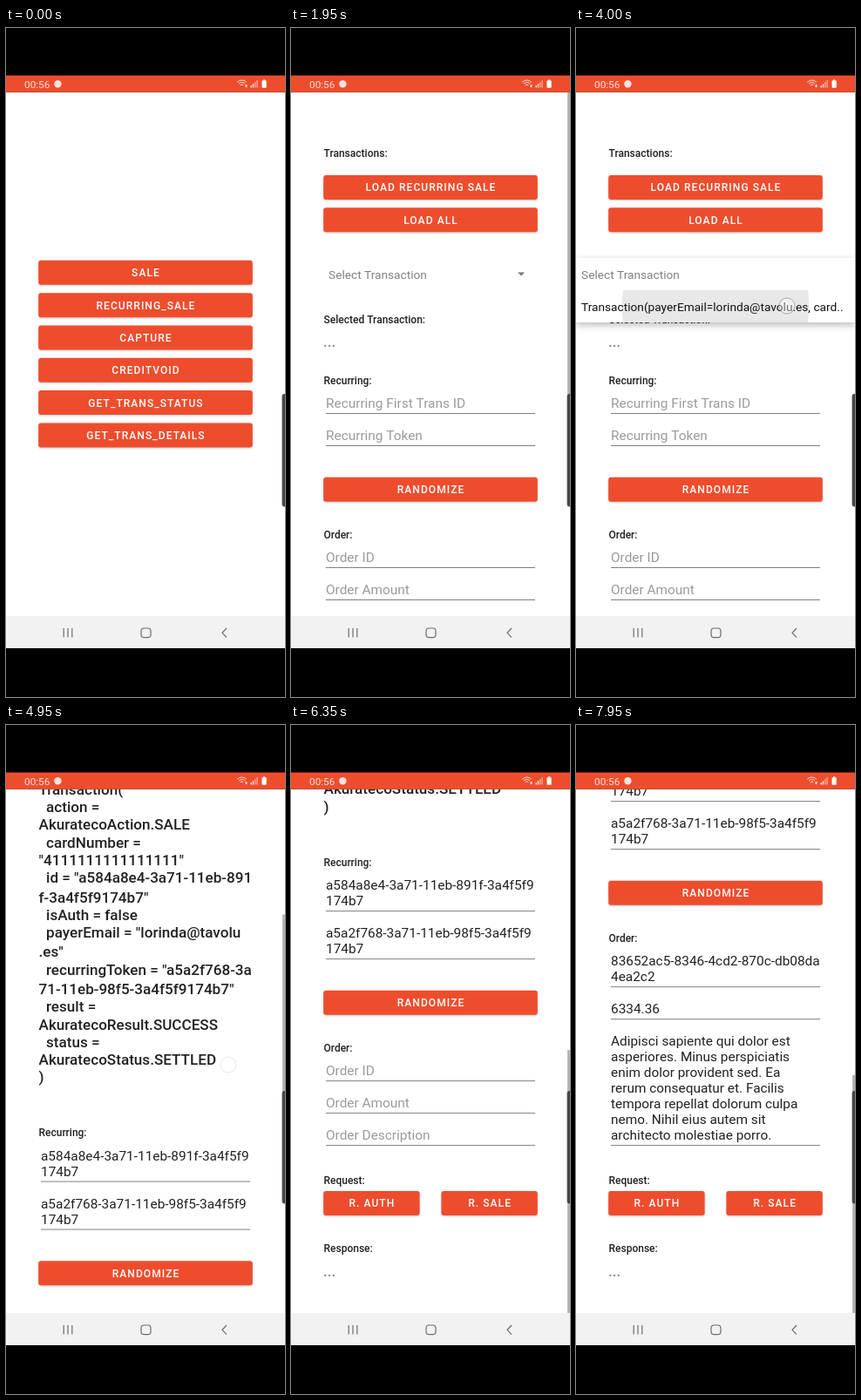
Animation of 320x768 px, one loop 8000 ms. Source, as an HTML page with a canvas:

```html
<!DOCTYPE html>
<html lang="en">
<head>
<meta charset="utf-8">
<title>Recurring sale</title>
<style>
  html, body { margin: 0; width: 100%; height: 100%; overflow: hidden; background: #000; }
  canvas { display: block; width: 320px; height: 768px; }
</style>
</head>
<body>
<canvas id="stage"></canvas>
<script>
const LOOP = 8000, W = 320, TOP = 73.7, BOTTOM = 675, VIEW = BOTTOM - TOP;
const RED = '#ee4d2d', INK = '#212121', HINT = '#9a9a9a';
const FILLED = 4200, RANDOM = 6780;
const stage = document.getElementById('stage');
const g = stage.getContext('2d');
const dpr = window.devicePixelRatio || 1;
stage.width = W * dpr;
stage.height = 768 * dpr;

const MENU = ['SALE', 'RECURRING_SALE', 'CAPTURE', 'CREDITVOID', 'GET_TRANS_STATUS', 'GET_TRANS_DETAILS'];
const DETAILS = [
  'Transaction(', '  action =', 'AkuratecoAction.SALE', '  cardNumber =', '"4111111111111111"',
  '  id = "a584a8e4-3a71-11eb-891', 'f-3a4f5f9174b7"', '  isAuth = false',
  '  payerEmail = "lorinda@tavolu', '.es"', '  recurringToken = "a5a2f768-3a',
  '71-11eb-98f5-3a4f5f9174b7"', '  result =', 'AkuratecoResult.SUCCESS',
  '  status =', 'AkuratecoStatus.SETTLED', ')'
];
const WRAPPED = [6, 9, 11];
const FIRST_ID = ['a584a8e4-3a71-11eb-891f-3a4f5f9', '174b7'];
const TOKEN = ['a5a2f768-3a71-11eb-98f5-3a4f5f9', '174b7'];
const ORDER_ID = ['83652ac5-8346-4cd2-870c-db08da', '4ea2c2'];
const DESCRIPTION = [
  'Adipisci sapiente qui dolor est', 'asperiores. Minus perspiciatis',
  'enim dolor provident sed. Ea', 'rerum consequatur et. Facilis',
  'tempora repellat dolorum culpa', 'nemo. Nihil eius autem sit', 'architecto molestiae porro.'
];

// Finger: shown from, released, x, start y, end y
const TOUCHES = [
  [1270, 1420, 235, 319, 319],
  [2400, 2560, 240, 184, 184],
  [3050, 3220, 240, 284, 284],
  [3850, 4060, 242, 319, 319],
  [4610, 4900, 255, 592, 390],
  [5370, 5800, 238, 411, 262],
  [6500, 6650, 238, 320, 320],
  [7310, 7640, 242, 470, 290]
];

const ramp = (t, a, b) => Math.min(1, Math.max(0, (t - a) / (b - a)));
const smooth = p => p * p * (3 - 2 * p);
const easeOut = p => 1 - (1 - p) ** 3;

function text(str, x, mid, size, color, weight = 400, align = 'left', spacing = 0) {
  g.font = `${weight} ${size}px Roboto, sans-serif`;
  g.letterSpacing = spacing + 'px';
  g.textAlign = align;
  g.fillStyle = color;
  g.fillText(str, x, mid + size * 0.355);
}

function box(x, y, w, h, r, color) {
  g.beginPath();
  g.roundRect(x, y, w, h, r);
  g.fillStyle = color;
  g.fill();
}

function line(points, color, width) {
  g.beginPath();
  points.forEach(([x, y]) => g.lineTo(x, y));
  g.strokeStyle = color;
  g.lineWidth = width;
  g.stroke();
}

function shadow(blur, dy, alpha, draw) {
  g.save();
  g.shadowColor = `rgba(0,0,0,${alpha})`;
  g.shadowBlur = blur * dpr;
  g.shadowOffsetY = dy * dpr;
  draw();
  g.restore();
}

// Circle that spreads inside a rectangle after a press, then fades
function ripple(t, start, x, y, w, h, color) {
  const p = ramp(t, start, start + 250);
  const alpha = 1 - ramp(t, start + 230, start + 400);
  if (!p || !alpha) return;
  g.save();
  g.globalAlpha *= alpha;
  g.beginPath();
  g.roundRect(x, y, w, h, 3);
  g.clip();
  g.beginPath();
  g.arc(x + w / 2, y + h / 2, p * 178, 0, 7);
  g.fillStyle = color;
  g.fill();
  g.restore();
}

function button(label, y, t, pressed, x = 37.2, w = 245.6) {
  shadow(2.5, 1, 0.22, () => box(x, y, w, 28, 3, RED));
  if (pressed) ripple(t, pressed, x, y, w, 28, 'rgba(255,255,255,.25)');
  text(label, x + w / 2 + 0.5, y + 14.2, 12, '#fff', 500, 'center', 1.07);
}

const label = (str, y) => text(str, 37.5, y, 12, INK, 500);
const dots = y => text('...', 37, y, 17.1, '#8a8a8a', 500);

// Draws a field and returns the y of its underline
function field(y, hint, lines) {
  (lines || [hint]).forEach((s, i) => text(s, 40, y + i * 18.05, 15.4, lines ? INK : HINT));
  const base = y + 12 + (lines ? lines.length - 1 : 0) * 18;
  line([[40, base], [280, base]], '#808080', 1);
  return base;
}

function scrollAt(t) {
  return 189 * ramp(t, 4680, 4900) ** 2 + 353.5 * easeOut(ramp(t, 4900, 5400))
    + 54.5 * smooth(ramp(t, 5500, 5750)) + 126 * smooth(ramp(t, 7380, 7800));
}

function menu(t) {
  MENU.forEach((s, i) => button(s, 266.8 + i * 37.33, t, i === 1 && 1300));
}

// Draws the form and returns the y of its end
function form(t) {
  const filled = t >= FILLED, random = t >= RANDOM;
  label('Transactions:', 144);
  button('LOAD RECURRING SALE', 168.9, t, 2430);
  button('LOAD ALL', 206.2, t);

  ripple(t, 3080, 37, 264, 246, 37, 'rgba(0,0,0,.08)');
  text(filled ? 'Transaction(payerEmail=lorinda@t..' : 'Select Transaction', 43, 283, 13.7, filled ? INK : '#808080');
  g.beginPath();
  g.moveTo(260, 280.5);
  g.lineTo(268, 280.5);
  g.lineTo(264, 284.5);
  g.fillStyle = '#757575';
  g.fill();

  label('Selected Transaction:', 334.5);
  let y = 360.5;
  if (filled) {
    DETAILS.forEach((s, i) => {
      if (i) y += WRAPPED.includes(i) ? 22.5 : 20.2;
      text(s, 37.5, y, 17.1, INK, 500);
    });
    y += 20;
  } else {
    dots(y - 0.6);
  }

  y += 44;
  label('Recurring:', y);
  y = field(y + 26, 'Recurring First Trans ID', filled && FIRST_ID);
  y = field(y + 25, 'Recurring Token', filled && TOKEN);
  y += 36.2;
  button('RANDOMIZE', y, t, 6530);

  y += 65.8;
  label('Order:', y);
  y = field(y + 26, 'Order ID', random && ORDER_ID);
  y = field(y + 25, 'Order Amount', random && ['6334.36']);
  y = field(y + 25, 'Order Description', random && DESCRIPTION);

  y += 40;
  label('Request:', y);
  button('R. AUTH', y + 12.3, t, 0, 37.2, 110.4);
  button('R. SALE', y + 12.3, t, 0, 172.4, 110.4);
  label('Response:', y + 78.5);
  dots(y + 104);
  return y + 152.5;
}

function popup(t) {
  const alpha = ramp(t, 3280, 3480) * (1 - ramp(t, 4150, 4300));
  if (!alpha) return;
  g.save();
  g.globalAlpha = alpha;
  shadow(9, 3, 0.28, () => box(0, 264, W, 74, 1, '#fff'));
  ripple(t, 3850, 0, 301, W, 37, '#e8e8e8');
  text('Select Transaction', 6, 283, 13.7, '#808080');
  text('Transaction(payerEmail=lorinda@tavolu.es, card..', 6, 320, 13.7, '#111');
  g.restore();
}

function scrollbar(t, scroll, end) {
  const alpha = ramp(t, 1750, 1800) * (1 - ramp(t, 2400, 2600))
    + ramp(t, 4640, 4700) * (1 - ramp(t, 6620, 6780)) + ramp(t, 7360, 7420);
  const ratio = VIEW / (end - TOP);
  g.save();
  g.globalAlpha = alpha;
  g.fillStyle = '#b4b4b4';
  g.fillRect(317, TOP + scroll * ratio, 3, VIEW * ratio);
  g.restore();
}

function formScreen(t) {
  const p = easeOut(ramp(t, 1520, 1820));
  if (!p) return;
  const scroll = scrollAt(t), size = 0.9 + 0.1 * p;
  g.save();
  g.globalAlpha = p;
  g.translate(160, 375);
  g.scale(size, size);
  g.translate(-160, -375);
  g.fillStyle = '#fff';
  g.fillRect(0, TOP, W, VIEW);
  g.translate(0, -scroll);
  const end = form(t);
  g.restore();
  popup(t);
  scrollbar(t, scroll, end);
}

function touches(t) {
  for (const [from, to, x, y0, y1] of TOUCHES) {
    const alpha = ramp(t, from, from + 60) * (1 - ramp(t, to, to + 70));
    if (!alpha) continue;
    const y = y0 + (y1 - y0) * ramp(t, from + 90, to) ** 2;
    g.save();
    g.globalAlpha = alpha;
    g.beginPath();
    g.arc(x, y, 9, 0, 7);
    g.fillStyle = 'rgba(255,255,255,.4)';
    g.fill();
    g.strokeStyle = 'rgba(125,125,125,.6)';
    g.lineWidth = 1;
    g.stroke();
    g.restore();
  }
}

function statusBar() {
  const pale = '#fde3dc';
  g.fillStyle = RED;
  g.fillRect(0, 54.5, W, TOP - 54.5);
  text('00:56', 21, 64.7, 11.8, pale);
  box(55.2, 60, 8.4, 8.4, 4.2, pale);
  g.strokeStyle = pale;
  g.lineWidth = 1;
  for (const r of [2.5, 5, 7.5]) {
    g.beginPath();
    g.arc(270.5, 67.5, r, -Math.PI * 0.75, -Math.PI * 0.25);
    g.stroke();
  }
  box(274.5, 65, 2, 3, 0.5, pale);
  for (let i = 0; i < 4; i++) {
    box(280.5 + i * 2.3, 66 - i * 2, 1.4, 2.5 + i * 2, 0, i < 2 ? pale : '#f7a898');
  }
  box(293.5, 60.3, 5.2, 8.4, 1, '#fff');
  box(295, 59.3, 2.2, 1.5, 0, '#fff');
}

function navBar() {
  const gray = '#6d6d6d';
  g.fillStyle = '#f2f2f2';
  g.fillRect(0, BOTTOM, W, 37);
  for (const x of [66.2, 71, 75.8]) line([[x, 689], [x, 699.5]], gray, 1.2);
  g.beginPath();
  g.roundRect(155, 689, 11, 10.6, 3.2);
  g.stroke();
  line([[253, 689], [248, 694.3], [253, 699.6]], gray, 1.2);
}

function draw(t) {
  g.setTransform(dpr, 0, 0, dpr, 0, 0);
  g.fillStyle = '#000';
  g.fillRect(0, 0, W, 768);
  g.fillStyle = '#fff';
  g.fillRect(0, TOP, W, VIEW);
  g.save();
  g.beginPath();
  g.rect(0, TOP, W, VIEW);
  g.clip();
  if (t < 1820) menu(t);
  formScreen(t);
  g.restore();
  statusBar();
  navBar();
  box(316.6, 420, 4, 129.5, [3, 0, 0, 3], '#454545');
  touches(t);
}

const begin = performance.now();
function tick() {
  draw((performance.now() - begin) % LOOP);
  requestAnimationFrame(tick);
}
tick();
</script>
</body>
</html>
```
